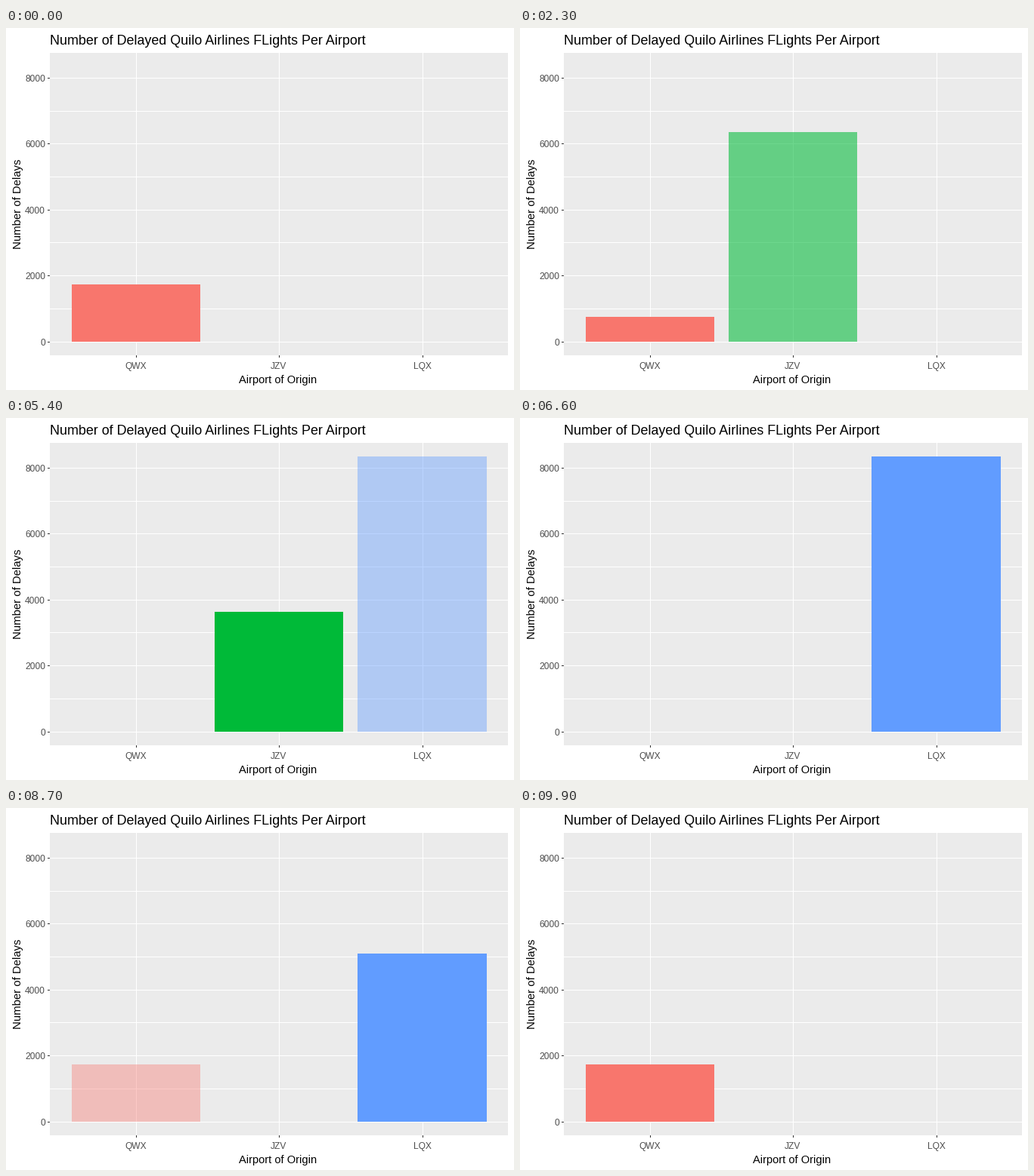
These frames come from a looping animation (672 px wide and 480 px high, 10000 ms). A matplotlib script:

```python
import math

import matplotlib.pyplot as plt
from matplotlib.animation import FuncAnimation
from matplotlib.patches import Rectangle

W, H, DPI = 672, 480, 96
FRAMES, INTERVAL = 100, 100

PANEL = (58, 33, 664, 434)      # left, top, right, bottom
ZERO, STEP = 415.6, 43.72       # pixel row of 0, pixels per 1000 delays
BASE = 416                      # bottom edge of the bars
CENTERS = (172, 361, 551)
CODES = ("QWX", "JZV", "LQX")

# left, right, full height, colour
BARS = (
    (87, 257, 76, "#F8766D"),
    (276, 446, 278, "#00BA38"),
    (465, 636, 365, "#619CFF"),
)

# last still step, number of steps, leaving bar, entering bar
MOVES = ((11, 22, 0, 1), (45, 22, 1, 2), (79, 21, 2, 0))

plt.rcParams["font.family"] = "Liberation Sans"
fig = plt.figure(figsize=(W / DPI, H / DPI), dpi=DPI, facecolor="white")
ax = fig.add_axes([0, 0, 1, 1])
ax.set_xlim(0, W)
ax.set_ylim(H, 0)
ax.axis("off")


def box(left, top, right, bottom, color, z=1):
    patch = Rectangle((left, top), right - left, bottom - top, facecolor=color,
                      linewidth=0, antialiased=False, zorder=z)
    ax.add_patch(patch)
    return patch


def label(x, y, text, px, color="black", ha="center", rotation=0):
    ax.text(x, y, text, fontsize=px * 72 / DPI, color=color, ha=ha,
            va="baseline", rotation=rotation, rotation_mode="anchor")


def draw_chart():
    left, top, right, bottom = PANEL
    box(left, top, right, bottom, "#EBEBEB")
    for i in range(9):
        row = round(ZERO - i * STEP)
        box(left, row, right, row + 1, "white", 2)
        if i % 2 == 0:
            box(left - 3, row, left, row + 1, "#333333", 2)
            label(52, row + 5, str(i * 1000), 12, "#4D4D4D", "right")
    for x, code in zip(CENTERS, CODES):
        box(x, top, x + 1, bottom, "white", 2)
        box(x, bottom, x + 1, bottom + 3, "#333333", 2)
        label(x, 452, code, 12, "#4D4D4D")
    label(58, 22, "Number of Delayed Quilo Airlines FLights Per Airport",
          17.9, ha="left")
    label(360, 471, "Airport of Origin", 14.65)
    label(20, 233.5, "Number of Delays", 14.9, rotation=90)


def ease(t):
    return (1 - math.cos(math.pi * t)) / 2


def pose(frame):
    """Return {bar: (height share, opacity)} for the visible bars."""
    # 101 steps are spread over 100 frames, so the middle one is skipped
    step = frame + (frame >= FRAMES // 2)
    shown = 0
    for start, length, leaving, entering in MOVES:
        k = step - start
        if 0 < k < length:
            p = ease(k / length)
            return {leaving: (1 - p, 1), entering: (1, p)}
        if k >= length:
            shown = entering
    return {shown: (1, 1)}


draw_chart()
bars = [box(l, BASE - h, r, BASE, color, 3) for l, r, h, color in BARS]


def update(frame):
    state = pose(frame)
    for i, bar in enumerate(bars):
        share, alpha = state.get(i, (0, 0))
        height = round(BARS[i][2] * share)
        bar.set_y(BASE - height)
        bar.set_height(height)
        bar.set_alpha(alpha)
        bar.set_visible(height > 0)
    return bars


anim = FuncAnimation(fig, update, frames=FRAMES, interval=INTERVAL,
                     repeat=True, repeat_delay=0, blit=False)
plt.show()
```
